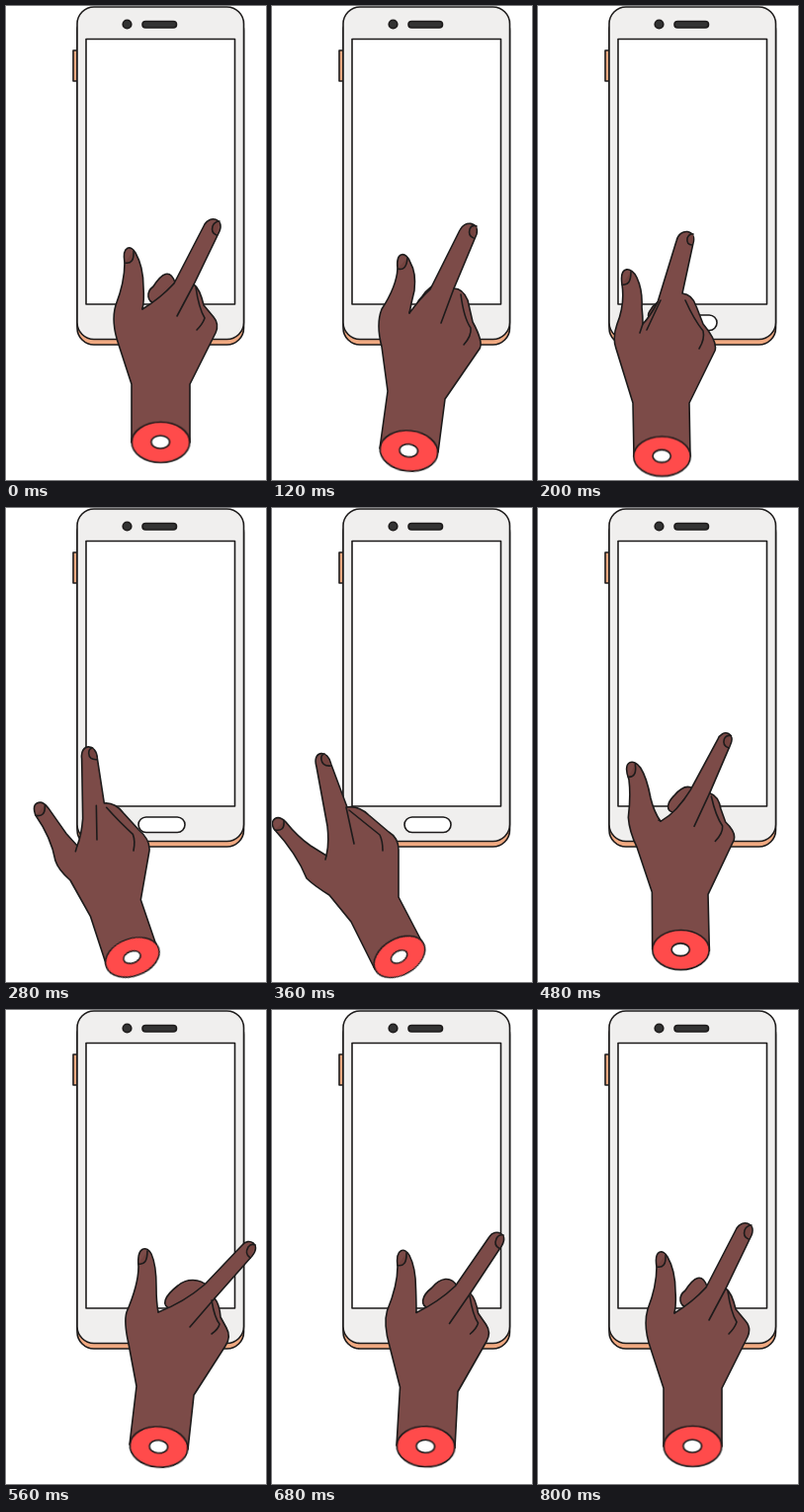
An HTML page without scripts that plays this animation: 263 px wide and 480 px high, repeating every 1.92 s.

```html
<!DOCTYPE html>
<html lang="en">
<head>
<meta charset="utf-8">
<title>Swiping hand</title>
<style>
html, body { margin: 0; width: 100%; height: 100%; overflow: hidden; background: #fff; }
svg { display: block; width: 100vw; height: 100vh; }
.ink { stroke: #1d1b1b; stroke-width: 1.6; stroke-linejoin: round; stroke-linecap: round; }
.skin { fill: #7c4b48; }
.nail { fill: #74433f; }
.line { fill: none; }
.move { animation: 1920ms -2ms infinite; }

/* Poses: rest, start, mid swipe, far left, return, overshoot; one step per 40 ms */
#hand { animation-name: hand; }
@keyframes hand {
  0%, 41.6667%, 100% { animation-timing-function: steps(3); d: path("M127,442 L127,383 L114,343 Q106,320 111,303 Q120,280 120,260 C117,242 127,242 131,250 Q139,264 139,285 Q140,298 138,307 Q156,296 170,281 L201,221 C206,212 221,215 216,228 L190,282 Q196,286 200,303 L210,315 Q216,322 212,331 L186,383 L186,442"); }
  6.25% { animation-timing-function: steps(2); d: path("M109,448 L117,390 L111,345 Q105,322 111,307 Q126,284 127,266 C125,248 136,248 140,260 Q146,270 144,288 Q141,300 139,311 Q150,296 160,287 L190,227 C194,217 210,218 207,231 L184,286 Q193,286 198,298 L203,320 Q214,340 210,347 L175,398 L168,452"); }
  10.4167% { animation-timing-function: steps(3); d: path("M97,456 L96,402 L79,347 Q75,336 80,322 Q88,302 85,282 C82,262 95,264 100,275 Q106,288 105,305 Q106,314 106,322 Q113,315 121,300 L140,238 C143,224 161,226 157,240 L146,291 Q156,292 160,304 L167,322 Q182,340 179,349 L153,402 L154,456"); }
  16.6667%, 18.75% { animation-timing-function: steps(2); d: path("M104,467 L80,419 L58,392 Q42,382 35,375 Q25,350 2,325 C-3,316 5,309 14,318 Q26,333 39,342 Q47,347 55,352 Q58,340 56,322 L45,262 C40,245 57,244 60,260 L76,303 Q87,301 98,311 L118,328 Q128,334 128,346 L128,394 L153,442"); }
  22.9167% { animation-timing-function: steps(3); d: path("M111,450 L107,393 L88,346 Q79,333 76,317 Q74,298 71,283 C61,264 74,260 82,271 Q89,280 95,301 Q100,314 109,323 Q121,314 131,289 L153,233 C157,219 172,223 167,236 L155,287 Q166,288 169,302 L173,316 Q189,329 185,337 L163,392 L168,450"); }
  29.1667% { animation-timing-function: steps(6); d: path("M125,440 L132,381 L124,338 Q119,316 122,306 Q134,278 134,260 C132,238 143,239 147,247 Q152,258 152,280 Q152,296 154,306 Q180,296 201,278 L239,238 C245,230 259,237 249,249 L211,292 Q216,298 217,311 L223,322 Q228,331 222,340 L190,390 L184,445"); }
}

#curl { animation-name: curl; }
@keyframes curl {
  0%, 41.6667%, 100% { animation-timing-function: steps(3); d: path("M171,280 C166,266 158,270 149,284 C141,290 143,300 151,301 Z"); }
  6.25% { animation-timing-function: steps(2); d: path("M166,280 C160,286 157,286 152,294 C147,299 146,302 147,304 Z"); }
  10.4167% { animation-timing-function: steps(3); d: path("M121,300 C117,303 115,305 113,309 C111,312 111,315 113,316 Z"); }
  16.6667%, 18.75% { animation-timing-function: steps(2); d: path("M68,310 C66,312 64,316 63,320 C62,325 62,330 64,332 Z"); }
  22.9167% { animation-timing-function: steps(3); d: path("M133,286 C127,284 123,292 119,298 C115,304 116,310 122,311 Z"); }
  29.1667% { animation-timing-function: steps(6); d: path("M204,280 C196,271 182,272 174,279 C161,289 155,300 168,303 Z"); }
}

/* Index edge, knuckle crease, thumb web */
#folds { animation-name: folds; }
@keyframes folds {
  0%, 41.6667%, 100% { animation-timing-function: steps(3); d: path("M190,282 L173,314 M192,285 Q195,306 201,316 Q199,322 193,328 M138,306 L138,307"); }
  6.25% { animation-timing-function: steps(2); d: path("M184,286 L171,321 M191,292 Q194,316 201,326 Q202,334 194,343 M139,310 L139,311"); }
  10.4167% { animation-timing-function: steps(3); d: path("M124,298 L110,328 M149,298 Q158,318 167,329 Q169,337 163,347 M106,322 L103,331"); }
  16.6667%, 18.75% { animation-timing-function: steps(2); d: path("M75,303 L83,340 M78,306 Q94,319 109,331 Q112,337 112,347 M55,352 L54,356"); }
  22.9167% { animation-timing-function: steps(3); d: path("M155,287 L144,323 M159,291 Q164,312 172,324 Q173,333 165,342 M109,323 L106,321"); }
  29.1667% { animation-timing-function: steps(6); d: path("M211,292 L186,321 M208,294 Q211,312 216,318 Q215,323 208,328 M154,305 L154,306"); }
}

#nails { animation-name: nails; }
@keyframes nails {
  0%, 41.6667%, 100% { animation-timing-function: steps(3); d: path("M120,260 Q130,262 129,248 M213,232 Q207,230 209,223 Q211,218 216,218"); }
  6.25% { animation-timing-function: steps(2); d: path("M127,266 Q136,269 137,255 M204,235 Q198,233 200,226 Q202,221 207,223"); }
  10.4167% { animation-timing-function: steps(3); d: path("M85,282 Q94,284 94,269 M156,242 Q150,242 151,235 Q153,230 157,231"); }
  16.6667%, 18.75% { animation-timing-function: steps(2); d: path("M3,326 Q13,328 12,317 M60,261 Q51,262 50,255 Q49,250 53,249"); }
  22.9167% { animation-timing-function: steps(3); d: path("M70,280 Q79,280 76,267 M166,239 Q159,238 160,231 Q162,226 167,227"); }
  29.1667% { animation-timing-function: steps(6); d: path("M134,257 Q143,259 143,244 M247,251 Q241,247 245,240 Q248,236 252,238"); }
}

#stump { animation-name: stump; }
@keyframes stump {
  0%, 41.6667%, 100% { animation-timing-function: steps(3); transform: translate(156.5px, 441.8px) rotate(0deg) scale(1, 1); }
  6.25% { animation-timing-function: steps(2); transform: translate(138.5px, 450.5px) rotate(6deg) scale(1, 1); }
  10.4167% { animation-timing-function: steps(3); transform: translate(125.5px, 456px) rotate(0deg) scale(.98, .98); }
  16.6667%, 18.75% { animation-timing-function: steps(2); transform: translate(129px, 454.5px) rotate(-30deg) scale(.95, .89); }
  22.9167% { animation-timing-function: steps(3); transform: translate(139.5px, 450px) rotate(-2deg) scale(.97, .97); }
  29.1667% { animation-timing-function: steps(6); transform: translate(154.6px, 442.5px) rotate(5deg) scale(1, 1); }
}
</style>
</head>
<body>
<svg viewBox="0 0 263 480">
  <g class="ink">
    <rect x="68" y="45" width="6" height="31" fill="#f0a981"/>
    <rect x="72" y="8" width="168.5" height="335" rx="17" fill="#f0a981"/>
    <rect x="72" y="1" width="168.5" height="336.5" rx="17" fill="#f0efee"/>
    <rect x="81" y="33.5" width="150.5" height="268.5" fill="#fff"/>
    <rect x="134" y="313" width="47" height="15.5" rx="7.75" fill="#fff"/>
    <circle cx="122.5" cy="18.5" r="4.3" fill="#333"/>
    <rect x="138" y="15.5" width="34.5" height="6.5" rx="3.25" fill="#333"/>
  </g>
  <g class="ink">
    <path id="curl" class="move skin"/>
    <path id="hand" class="move skin"/>
    <path id="folds" class="move line"/>
    <path id="nails" class="move nail"/>
    <g id="stump" class="move">
      <ellipse rx="29.3" ry="20.5" fill="#ff4b4b"/>
      <ellipse cx="-.3" cy="-.3" rx="9.3" ry="6.5" fill="#fff"/>
    </g>
  </g>
</svg>
</body>
</html>
```
